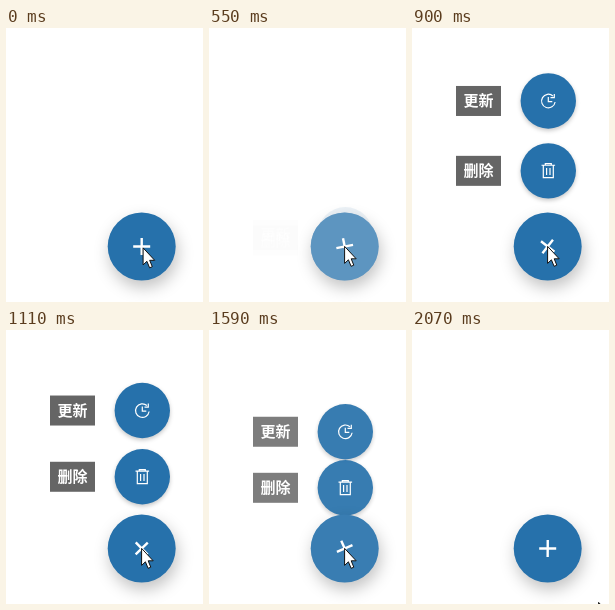
An HTML page for the animation above (2140 ms loop, 197 px wide and 274 px high).

```html
<!DOCTYPE html>
<html lang="zh">
<head>
<meta charset="utf-8">
<style>
  html, body { margin: 0; height: 100%; overflow: hidden; background: #fff; }
  svg { display: block; }
  text { font: 700 15px "Noto Sans CJK SC", "Noto Sans CJK", sans-serif; fill: #fff; text-anchor: middle; }
  .tag rect { fill: #656565; }
  .disc { fill: #2671ab; }
  .item .disc { filter: drop-shadow(0 2px 2px rgba(0, 0, 0, .22)); }
  #main .disc { filter: drop-shadow(2px 7px 8px rgba(0, 0, 0, .24)); }
  .line { fill: none; stroke: #fff; stroke-width: 1.2; }
  #plus { stroke-width: 2.4; }
</style>
</head>
<body>
<svg width="197" height="274" viewBox="0 0 197 274">
  <g class="item">
    <g class="tag"><rect x="44" y="-15" width="45" height="30"/><text x="66.5" y="5.2">更新</text></g>
    <g class="dot" transform="translate(136.3 0)">
      <circle class="disc" r="27.7"/>
      <path class="line" d="M4.6 -5A6.8 6.8 0 1 0 6.8 1M6 -7V-3.4H2.2M0 -4V.6H4"/>
    </g>
  </g>
  <g class="item">
    <g class="tag"><rect x="44" y="-15" width="45" height="30"/><text x="66.5" y="5.2">删除</text></g>
    <g class="dot" transform="translate(136.3 0)">
      <circle class="disc" r="27.7"/>
      <path class="line" d="M-6.8 -5.6H6.8M-3 -5.8V-7.2H3V-5.8M-5 -5.4V6.8H5V-5.4M-1.7 -2.8V4.2M1.7 -2.8V4.2"/>
    </g>
  </g>
  <g id="main" transform="translate(135.7 218.5)">
    <circle class="disc" r="34"/>
    <circle id="flash" r="34" fill="#fff"/>
    <path id="plus" class="line" d="M-8.5 0H8.5M0 -8.5V8.5"/>
  </g>
  <path id="cursor" d="M0 0V17L3.8 13.4L6.5 19.9L9.2 18.8L6.6 12.4H11.6Z" fill="#fff" stroke="#111"/>
</svg>
<script>
const LOOP = 2140, OPEN = 515, CLOSE = 1540, HOME = 218.5;
const $ = s => document.querySelector(s);
const items = [...document.querySelectorAll('.item')];
const rests = [80, 146.5];

const clamp = u => Math.min(1, Math.max(0, u));

function smooth(t, start, length) {
  const u = clamp((t - start) / length);
  return u * u * (3 - 2 * u);
}

// Underdamped spring from 0 to 1.
function spring(t) {
  if (t < 0) return 0;
  const speed = .013, zeta = .65, root = Math.sqrt(1 - zeta * zeta);
  const x = speed * t, w = root * x;
  return 1 - Math.exp(-zeta * x) * (Math.cos(w) + zeta / root * Math.sin(w));
}

// Button lightens while pressed, then recovers.
const press = (t, peak) => .25 * (smooth(t, peak - 170, 150) - smooth(t, peak, 320));

// The picture advances in 70 ms ticks with a few longer rests.
function tick(t) {
  if (t < 480) return t < 70 ? 0 : t < 400 ? 70 : 400;
  if (t >= 2070) return 2070;
  const start = t < 1520 ? 480 : 1520;
  const step = start + Math.floor((t - start) / 70) * 70;
  return t < 1520 ? Math.min(step, 1320) : step;
}

function draw(t) {
  const lift = spring(t - OPEN) - spring(t - CLOSE);
  const fade = smooth(t, OPEN, 200) - smooth(t, CLOSE, 280);
  items.forEach((item, i) => {
    item.setAttribute('transform', `translate(0 ${HOME + (rests[i] - HOME) * lift})`);
    item.querySelector('.dot').style.opacity = fade;
    item.querySelector('.tag').style.opacity = fade ** 2;
  });
  $('#flash').style.opacity = press(t, 570) + press(t, 1700);
  $('#plus').setAttribute('transform', `rotate(${-135 * lift})`);

  const away = clamp((t - 1870) / 200), nudge = t < 70 ? 1.5 : 0;
  $('#cursor').setAttribute('transform',
    `translate(${135.6 + nudge + 51 * away} ${218.4 + nudge + 54 * away})`);
}

const begin = performance.now();
function loop() {
  draw(tick((performance.now() - begin) % LOOP));
  requestAnimationFrame(loop);
}
loop();
</script>
</body>
</html>
```
